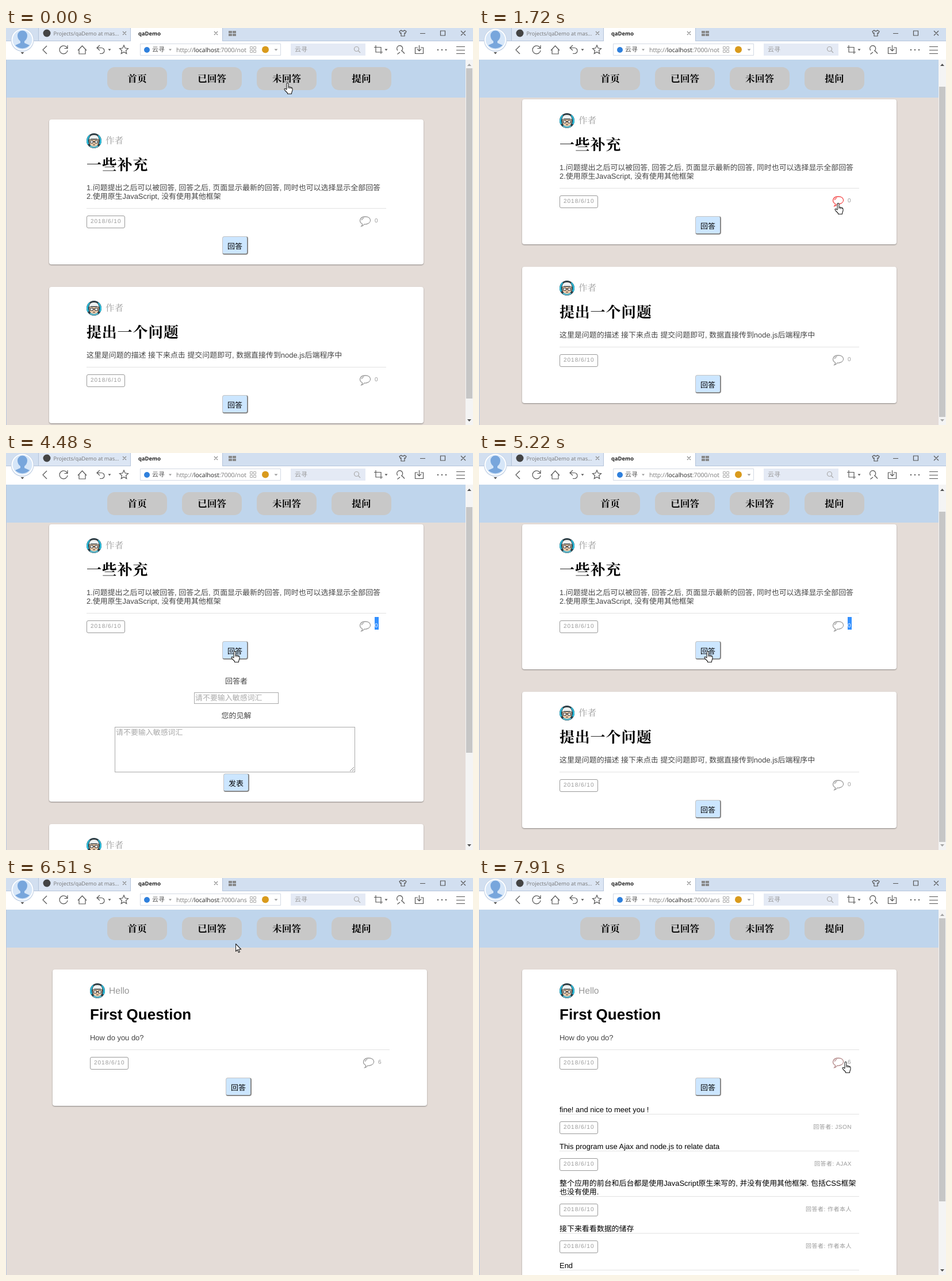
Write an HTML page that moves like this. It is 812x690 px and loops after 8 s.

```html
<!DOCTYPE html>
<html lang="zh">
<head>
<meta charset="utf-8">
<title>qaDemo</title>
<style>
html, body { margin: 0; width: 100%; height: 100%; overflow: hidden; }
body { position: relative; background: #fff; text-rendering: geometricPrecision;
  font: 12.95px/15px "Liberation Sans", "Noto Sans CJK SC", "Noto Sans CJK", sans-serif; color: #444; }
#chrome, #cursor { position: absolute; left: 0; top: 0; }
#chrome text { font-family: "Open Sans", "Noto Sans CJK SC", "Noto Sans CJK", sans-serif; }
#view { position: absolute; left: 1px; top: 55px; width: 811px; height: 635px; overflow: hidden; background: #e4dcd7; }
#edge { position: absolute; left: 0; top: 55px; width: 1px; height: 635px; background: #b9c7dc; }
#nav { position: absolute; width: 811px; height: 66px; background: #bfd5ec; }
#nav b { position: absolute; top: 13px; width: 104px; height: 40px; border-radius: 13px; background: #c8c8c8;
  color: #000; font-size: 16.7px; line-height: 41px; text-align: center; }
#nav b, h1, .who { font-family: "Liberation Sans", "Noto Serif CJK SC", "Noto Sans CJK SC", "Noto Sans CJK", serif; }
#nav b, h1 { font-weight: 600; }
.page { position: absolute; left: 74px; top: 104px; width: 651px; }
.card { padding: 24px 65px 17px; margin-bottom: 39px; border-radius: 4px; background: #fff; box-shadow: 0 1px 2px #0006; }
.who { position: relative; height: 26px; padding-left: 33px; font-size: 15.6px; line-height: 28px; color: #999; font-weight: 300; }
.who svg { position: absolute; left: 0; top: 0; }
h1 { margin: 8px 0 13px; font-size: 26px; line-height: 40px; color: #000; }
#open h1 { position: relative; top: 1px; letter-spacing: .8px; }
p { margin: 0; white-space: nowrap; }
.meta { position: relative; height: 22px; padding-top: 12px; border-top: 1px solid #e2e2e2; font-size: 10px; color: #999; }
.card > .meta { margin-top: 13px; }
.date { box-sizing: border-box; width: 67px; height: 22px; border: 1px solid #999; border-radius: 3px;
  padding-left: 6px; line-height: 20px; letter-spacing: 1px; color: #999; }
.meta svg { position: absolute; left: 474px; top: 12px; }
.count { position: absolute; left: 501px; top: 6px; width: 7px; height: 22px; line-height: 32px; }
.count.sel { background: #3390ff; color: #fff; }
.by { position: absolute; right: 13px; top: 15px; letter-spacing: .5px; }
.btn { box-sizing: border-box; width: 45px; height: 32px; margin: 14px 0 0 236px; padding-top: 3px; border: solid;
  border-width: 1px 2px 2px 1px; border-color: #c4c4c4 #888 #888 #c4c4c4; border-radius: 4px;
  background: #cce6ff; color: #000; line-height: 28px; text-align: center; }
.form { position: relative; height: 230px; }
.form > * { position: absolute; box-sizing: border-box; }
.form p { width: 521px; text-align: center; }
.box { border: 1px solid #a9a9a9; color: #a9a9a9; padding: 1px; }
.box svg { position: absolute; right: 0; bottom: 0; }
.form .btn { left: 238px; top: 198px; margin: 0; }
.answers { padding-top: 16px; color: #000; }
.answers .meta { margin-bottom: 14px; }
#bar { position: absolute; left: 798px; top: 0; width: 13px; height: 635px; background: #f4f4f4; }
#thumb { position: absolute; left: 1px; width: 11px; background: #c6c6c6; }
#bar svg { position: absolute; left: 3px; }
</style>
</head>
<body>
<svg id="chrome" width="812" height="55" fill="none" stroke="#555" stroke-width="1.2">
  <path fill="#d2dff0" stroke="none" d="M0 0h812v22H0z"/>
  <path fill="#dce6f4" stroke="none" d="M57 0h159v22H57z"/>
  <path fill="#fff" stroke="none" d="M217 0h159v23H217z"/>
  <path stroke="#b5c4da" stroke-width="1" d="M56.5 0v22M216.5 0v22M376.5 0v22M0 22.5h217M376 22.5h436"/>
  <g stroke="none">
    <circle cx="28.5" cy="21" r="20" fill="#c3d2e6"/>
    <circle cx="28.5" cy="20.5" r="19" fill="#fff"/>
    <circle cx="28.5" cy="20.5" r="17" fill="#d6e6f8"/>
    <path fill="#78a6dc" d="M20 13a8.500 8.500 0 0 1 17 0q0 6-5 10v3l9 4a17 17 0 0 1-25 0l9-4v-3q-5-4-5-10z"/>
    <path fill="#555" d="M25.500 42h6l-3 3.500zM177.500 36.500h5l-2.500 3zM658.500 36.500h5l-2.500 3z"/>
    <path fill="#999" d="M283 36.500h5l-2.500 3zM466.500 36.500h6l-3 3z"/>
    <circle cx="71" cy="9" r="6.500" fill="#444"/>
    <path fill="#888" d="M387 5h6v4h-6zm7 0h6v4h-6zm-7 5h6v4h-6zm7 0h6v4h-6z"/>
  </g>
  <path stroke="#888" d="M203 6l6 6m0-6l-6 6M362 6l6 6m0-6l-6 6"/>
  <path d="M687 4l-3 2 1.500 3 1.500-.5V14h6V8.500l1.500.5 1.500-3-3-2q-3 3-6 0zM720 9.500h9M755.500 5h8v8h-8zM791 5l8 8m0-8l-8 8"/>
  <path d="M71 31l-7 7 7 7M106.500 35a7 7 0 1 0 .5 4M107 30v5.500h-5.500M125 39l7.500-8 7.500 8M127 37.500V45h11v-7.500M163 30l-5 4.500 5 4.500M158 34.500h8a5 5 0 0 1 0 10h-3M205 30l2.200 5 5.300.6-4 3.600 1.200 5.400-4.700-2.800-4.700 2.800 1.200-5.400-4-3.600 5.300-.6z"/>
  <path d="M643 30v12h12M640 33.500h12V45M685 42l-4.500 3.500M681 39a5 5 0 1 1 6 1M688 39l5 5.500M716 34h-4.500v10.500h14V34H721M718.500 30v10m-3.500-3.500l3.500 3.500 3.500-3.500M783 32.500h15M783 38.500h15M783 44.500h15"/>
  <path stroke-width="2" d="M750 38h2m5 0h2m5 0h2"/>
  <path stroke="#d3d9e4" stroke-width="1" d="M233.500 27.500h244v20h-244z"/>
  <path fill="#e4eaf5" stroke="none" d="M495 27h130v21H495z"/>
  <circle cx="609.500" cy="36.500" r="4" stroke="#aaa"/><path stroke="#aaa" d="M612.500 39.500l3.500 3.500"/>
  <circle cx="245" cy="38" r="5" fill="#2f80dd" stroke="none"/>
  <circle cx="451" cy="37.500" r="6" fill="#d99a1c" stroke="none"/>
  <path stroke="#aaa" stroke-width="1" d="M424.500 32.500h4v4h-4zm6 0h4v4h-4zm-6 6h4v4h-4zm6 0h4v4h-4z"/>
  <path id="spin" stroke="#999" stroke-width="1.500" d="M227 10a5 5 0 1 1 5 4"/>
  <g stroke="none" fill="#777">
    <text x="82.500" y="12.500" font-size="9.300">Projects/qaDemo at mas...</text>
    <text id="tab" y="12.500" font-size="9.350" font-weight="bold" fill="#222">qaDemo</text>
    <text x="254" y="41" font-size="11" fill="#555">云寻</text>
    <text x="502" y="41" font-size="11" fill="#999">云寻</text>
    <svg x="296" y="27" width="123" height="20"><text y="14.500" font-size="10.500">http://<tspan fill="#222">localhost</tspan>:7000/<tspan id="path"></tspan></text></svg>
  </g>
</svg>
<div id="view">
  <div class="page" id="open"></div>
  <div class="page" id="done"></div>
  <div id="nav"></div>
  <div id="bar">
    <svg width="7" height="635"><path id="up" d="M0 11l3.500-4 3.500 4z"/><path id="down" d="M0 625l3.500 4 3.500-4z"/></svg>
    <div id="thumb"></div>
  </div>
</div>
<div id="edge"></div>
<svg id="cursor" width="20" height="24" fill="#fff" stroke="#222" stroke-width="1.100" stroke-linejoin="round">
  <path id="hand" d="M5 12V2a1.500 1.500 0 0 1 3 0v5l5 1.200q2 .5 2 2.300v3l-1.500 4.500v1.500h-7V18L2 13.500Q.3 11 1.500 10.500T5 12zM8 7v3M10.500 8v2.500M13 8.500v2"/>
  <path id="arrow" d="M.5.5v13l3-2.800 2 4.800 2-.9-2-4.600h4.200z"/>
</svg>
<script>
const $ = id => document.getElementById(id);
const LOOP = 8000, MAX_SCROLL = 35, TRACK = 606, VIEW = 635;

const avatar = `<svg width="26" height="26"><circle cx="13" cy="13" r="13" fill="#2a3d46"/>
  <path d="M3 19A12 12 0 0 1 6 4M20 4a12 12 0 0 1 3 15" fill="none" stroke="#2ab9d8" stroke-width="3"/>
  <path d="M7 21h12l2 2a13 13 0 0 1-16 0z" fill="#59b4c8"/>
  <path d="M5 11h16v5q-1 6-8 7-7-1-8-7z" fill="#f1cfae"/>
  <path d="M4 12q0-9.500 9-9.500t9 9.500l-4-2H8z" fill="#eef2f2" stroke="#222" stroke-width=".8"/>
  <path d="M6.500 13h5v4h-5zm8 0h5v4h-5zm-3 1.500h3M11 20h4" fill="#fff" stroke="#222"/></svg>`;
const bubble = `<svg width="22" height="21" fill="none" stroke="#999" stroke-width="1.300">
  <path d="M5.500 14.500C-1 11 .5 2 11 2s12 11 1 13q-2 .3-3 0-2 3-5 3.500 2-2 1.500-4z"/><path d="M4.500 8q.5-3 4-4"/></svg>`;
const date = '<div class="date">2018/6/10</div>';
const meta = inner => `<div class="meta">${date}${inner}</div>`;
const btn = label => `<div class="btn">${label}</div>`;
const card = (who, title, text, count, extra = '') => `<div class="card">
  <div class="who">${avatar}${who}</div><h1>${title}</h1><p>${text}</p>
  ${meta(`${bubble}<span class="count">${count}</span>`)}${btn('回答')}${extra}</div>`;
const answer = ([text, by]) => `<p>${text}</p>${meta(`<span class="by">回答者: ${by}</span>`)}`;
const hint = '请不要输入敏感词汇';

const form = `<div class="form" id="form"><p style="top:30px">回答者</p>
  <div class="box" style="left:187px;top:57px;width:147px;height:20px">${hint}</div>
  <p style="top:90px">您的见解</p>
  <div class="box" style="left:49px;top:117px;width:418px;height:79px">${hint}
  <svg width="9" height="9" stroke="#888"><path d="M1 8l7-7M5 8l3-3"/></svg></div>
  ${btn('发表')}</div>`;
const answers = [
  ['fine! and nice to meet you !', 'JSON'],
  ['This program use Ajax and node.js to relate data', 'AJAX'],
  ['整个应用的前台和后台都是使用JavaScript原生来写的, 并没有使用其他框架. 包括CSS框架<br>也没有使用.', '作者本人'],
  ['接下来看看数据的储存', '作者本人'],
  ['End', '作者本人']
];

$('nav').innerHTML = ['首页', '已回答', '未回答', '提问']
  .map((s, i) => `<b style="left:${175 + 130 * i}px">${s}</b>`).join('');
$('open').innerHTML =
  card('作者', '一些补充', '1.问题提出之后可以被回答, 回答之后, 页面显示最新的回答, 同时也可以选择显示全部回答<br>2.使用原生JavaScript, 没有使用其他框架', 0, form) +
  card('作者', '提出一个问题', '这里是问题的描述 接下来点击 提交问题即可, 数据直接传到node.js后端程序中', 0);
$('done').innerHTML = card('Hello', 'First Question', 'How do you do?', 6,
  `<div class="answers" id="answers">${answers.map(answer).join('')}</div>`);

// Pointer legs: start, end, steps, x, y, ends on a link
const legs = [
  [270, 420, 2, 511, 298, 0],
  [1270, 1720, 4, 624, 304, 1],
  [3210, 3210, 1, 584, 284, 0],
  [3330, 3580, 3, 505, 127, 0],
  [3700, 3950, 3, 382, 356, 1],
  [4200, 4200, 1, 397, 344, 1],
  [5350, 5950, 6, 366, 85, 1],
  [6400, 7200, 7, 600, 290, 0],
  [7350, 7750, 4, 637, 319, 1]
];

const step = (t, a, b, n) => t < a ? 0 : t >= b ? 1 : (1 + Math.floor((t - a) / (b - a) * (n - 1))) / n;
const ramp = (t, a, b) => Math.min(1, Math.max(0, (t - a) / (b - a)));
const show = (id, on) => $(id).style.display = on ? '' : 'none';
const tint = (page, k) => $(page).querySelector('.meta svg').style.stroke =
  `rgb(${153 + 90 * k},${153 - 85 * k},${153 - 85 * k})`;

function pointer(t) {
  let x = 489, y = 95, hand = 1;
  for (const [a, b, n, tx, ty, link] of legs) {
    const p = step(t, a, b, n);
    if (!p) break;
    x += (tx - x) * p;
    y += (ty - y) * p;
    hand = p === 1 && link;
  }
  show('hand', hand);
  show('arrow', !hand);
  $('cursor').style.transform = `translate(${Math.round(x) - (hand ? 6 : 0)}px,${Math.round(y)}px)`;
}

function scrollbar(scroll, height) {
  const shade = active => active ? '#505050' : '#a3a3a3';
  $('thumb').style.top = 15 + scroll / height * TRACK + 'px';
  $('thumb').style.height = VIEW / height * TRACK + 'px';
  $('up').style.fill = shade(scroll > 0);
  $('down').style.fill = shade(scroll + VIEW < height);
}

function draw(t) {
  const done = t >= 6400, loading = t >= 6150 && !done;
  const asking = t >= 4330 && t < 5220, replies = t >= 7910;
  const scroll = done ? 0 : Math.round(MAX_SCROLL * step(t, 720, 840, 2));

  show('open', !done);
  show('done', done);
  show('form', asking);
  show('answers', replies);
  $('done').style.left = replies ? '74px' : '80px';
  $('open').style.transform = `translateY(${-scroll}px)`;
  $('open').querySelector('.count').classList.toggle('sel', t >= 2530);
  tint('open', ramp(t, 1420, 1720) - ramp(t, 3330, 3700));
  tint('done', replies ? .25 : ramp(t, 7480, 7750));

  show('bar', !done || replies);
  scrollbar(scroll, done ? 782 : asking ? 900 : 670);

  show('spin', loading);
  $('spin').setAttribute('transform', `rotate(${(t - 6270) * .5} 232 9)`);
  $('tab').setAttribute('x', loading ? 243 : 230);
  $('path').textContent = t < 6150 ? 'not' : 'ans';
  pointer(t);
}

const start = performance.now();
(function tick() {
  draw((performance.now() - start) % LOOP);
  requestAnimationFrame(tick);
})();
</script>
</body>
</html>
```
